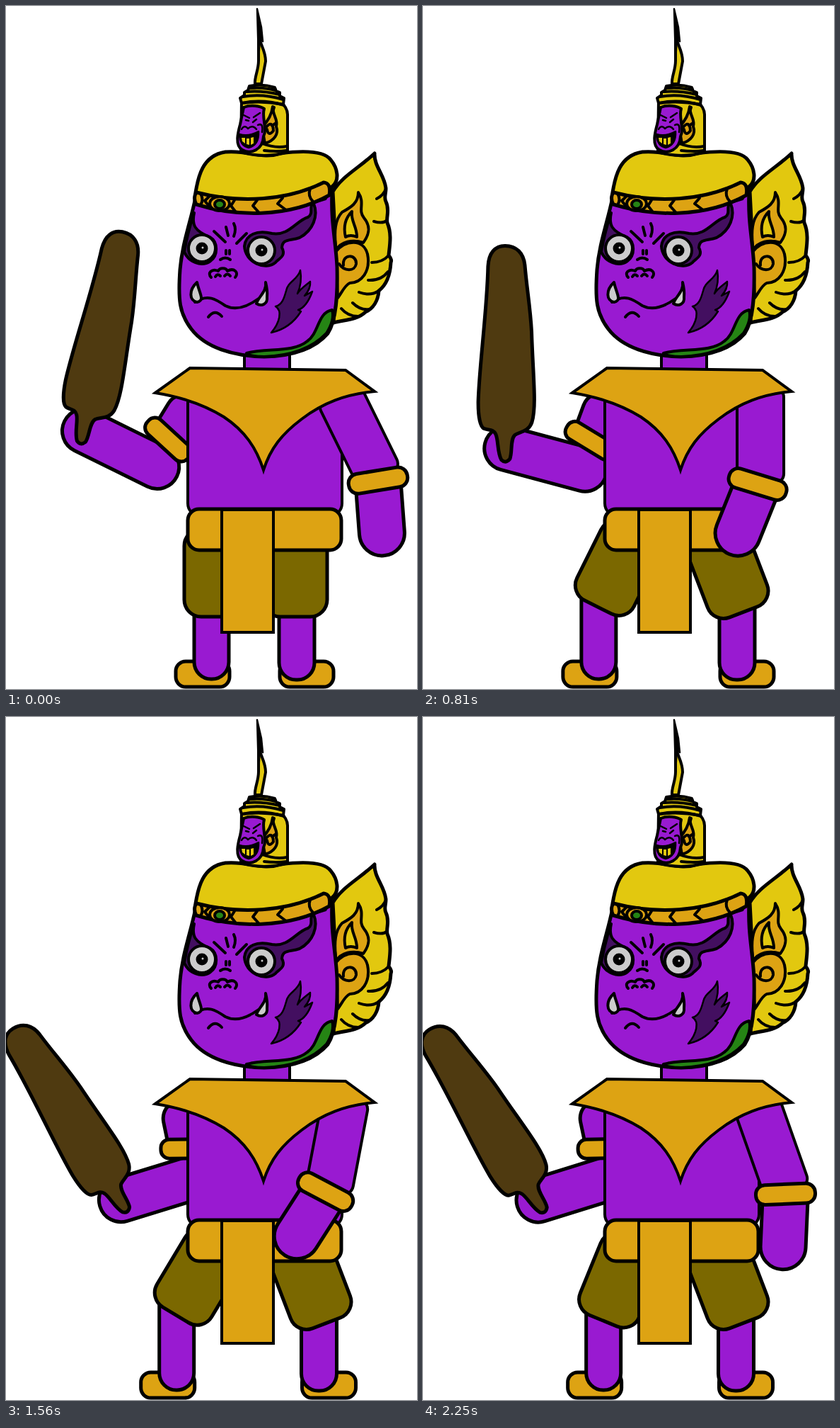
An HTML page that plays this animation: 581x964 px, repeating every 2280 ms.

```html
<!DOCTYPE html>
<html lang="en">
<head>
<meta charset="utf-8">
<title>Marching giant</title>
<style>
html, body { margin: 0; width: 100%; height: 100%; overflow: hidden; background: #fff; }
svg { display: block; width: 581px; height: 964px; }
svg * { stroke-linejoin: round; stroke-linecap: round; }
.body { stroke: #000; stroke-width: 5; }
.p { fill: #991ad1; }
.g { fill: #dda313; }
.y { fill: #e2c80f; }
.o { fill: #7b6800; }
.d { fill: #430f60; }
.n { fill: none; }
.k { fill: #000; }
.thin { stroke-width: 4; }
.fine { stroke-width: 2.5; }
</style>
</head>
<body>
<svg viewBox="0 0 581 964">
<g class="body">
  <g id="armL">
    <rect class="p" x="224" y="546" width="52" height="126" rx="26" transform="rotate(20 250 576)"/>
    <rect class="p" x="87" y="594" width="177" height="62" rx="31" transform="rotate(14.7 118 625)"/>
    <rect class="g" x="198.500" y="600" width="77" height="27" rx="12" transform="rotate(31 237 613)"/>
    <path fill="#4f3a10" d="M115 339C101 339 92 349 91 368C90 430 79 510 78 560C78 580 81 594 86 597C93 600 99 597 103 605C107 614 105 630 111 641Q117 647 123 640C127 630 123 613 130 606C137 601 149 602 154 588C161 565 155 520 153 460C151 425 146 400 143 366C141 349 131 339 115 339Z"/>
  </g>

  <g id="shinL">
    <rect class="g" x="240" y="925" width="76" height="36" rx="14"/>
    <rect class="p" x="266" y="800" width="49" height="150" rx="24"/>
  </g>
  <g id="shinR">
    <rect class="g" x="387" y="925" width="76" height="36" rx="14"/>
    <rect class="p" x="386" y="800" width="50" height="151" rx="24"/>
  </g>
  <rect id="thighL" class="o" x="252" y="738" width="90" height="124" rx="24"/>
  <rect id="thighR" class="o" x="364" y="735" width="90" height="127" rx="24"/>

  <rect class="p thin" x="337" y="480" width="64" height="50"/>
  <rect class="p thin" x="257" y="520" width="218" height="200" rx="18"/>
  <rect class="g" x="257" y="710" width="217" height="58" rx="16"/>
  <rect class="g thin" x="305" y="711" width="73" height="173" style="stroke-linejoin:miter"/>

  <g id="armR">
    <rect class="p thin" x="444" y="538" width="66" height="136" rx="14"/>
    <path class="p" d="M413 672V744A32 32 0 0 0 477 744V672Z" transform="rotate(22 445 744)"/>
    <rect class="g" x="431" y="661" width="84" height="28" rx="13" transform="rotate(17 473 675)"/>
  </g>
  <path class="g thin" style="stroke-linejoin:miter" d="M211 546L260 511L480 514L521 544C480 548 448 560 418 583C390 604 374 624 364 655C354 624 338 600 308 580C279 562 249 552 211 546Z"/>

  <!-- ear -->
  <path class="y" d="M462 262C475 240 500 228 521 208C520 226 536 240 537 258C537 265 534 270 537 276C543 288 537 298 539 306C546 322 542 340 541 352Q546 358 544 362C543 382 536 395 527 402C526 416 519 427 508 432C497 443 478 443 463 447L466 340Z"/>
  <path class="n thin" d="M537 258Q534 267 524 272M539 302Q533 308 520 304M541 352Q532 362 517 362M540 375Q530 388 512 387M527 402Q515 410 499 404M514 428Q501 430 490 419M498 438Q483 438 474 427"/>
  <path class="g thin" d="M466 338C464 318 465 302 475 291C488 284 498 278 498 263C508 278 497 288 506 299C516 311 514 322 505 334C490 329 474 332 466 345Z"/>
  <path class="y thin" d="M480 326C476 309 482 297 489 290C487 304 496 310 496 326Q487 322 480 326Z"/>
  <path class="g thin" d="M466 347C480 330 505 328 511 350C516 375 502 391 486 391C479 394 475 404 469 412Z"/>
  <path class="n thin" d="M477 366C475 349 496 350 495 364C493 375 478 375 471 364"/>

  <!-- face -->
  <path class="p" d="M268 270C261 305 249 335 246 372C243 415 245 434 262 456C282 482 320 494 365 495C405 494 437 483 455 462C467 443 469 408 468 368C466 330 459 305 461 262Z"/>
  <path fill="#258414" class="thin" d="M340 490C370 482 405 490 426 473C443 461 440 433 461 429Q465 443 453 462C432 484 400 494 365 495Q345 495 340 490Z"/>
  <path class="d thin" d="M266 292C262 310 268 318 288 326C300 333 300 352 289 360C276 369 258 361 252 347Q257 318 266 292Z"/>
  <path class="d thin" d="M337 339C339 322 355 316 376 321C400 325 410 303 427 298C436 292 427 282 435 279C442 296 434 317 415 327C401 332 391 328 390 341C397 354 384 357 381 362C367 374 338 362 337 339Z"/>
  <g id="eyes"></g>
  <path class="n thin" d="M294 318L310 333M340 321L326 335M311 312L314 324M322 307Q326 315 322 325M311 345V350M316 345V350M303 358Q310 353 317 358"/>
  <path class="n thin" d="M290 383C284 377 291 370 300 374C302 369 311 369 313 374C322 369 330 376 324 383M296 382Q299 377 303 381M309 381Q313 376 317 381M286 439Q295 427 305 438"/>
  <path class="n thin" d="M267 418C285 406 297 414 310 423C326 431 342 424 357 413"/>
  <path fill="#ccc" class="thin" d="M270 390C258 401 259 416 270 418C282 416 273 405 270 390Z"/>
  <path fill="#ccc" class="thin" d="M367 390C369 403 357 410 354 420C362 425 370 420 369 411Q370 402 367 390Z"/>
  <path class="d fine" d="M416 373C413 386 398 389 396 402C393 413 390 422 381 424C391 430 387 447 375 461C393 457 407 447 417 431L413 429Q425 425 433 403L422 409Q431 399 430 389C424 394 416 399 412 406Q419 390 416 373Z"/>

  <!-- crown -->
  <path class="y" d="M267 270C271 240 278 211 310 206C345 203 360 217 388 208C419 204 449 204 459 217C469 229 472 246 461 255L451 272C400 289 321 288 268 276Z"/>
  <path class="g" d="M269 263C330 279 397 275 449 249Q460 250 457 267C398 300 323 297 269 280Q264 271 269 263Z"/>
  <path class="n thin" d="M275 265Q280 273 275 281M287 269L281 275L289 285M323 274L318 282L325 291M355 274L349 282L358 292M391 271L384 279L396 288M430 258Q426 268 434 276"/>
  <ellipse class="g thin" cx="302" cy="279" rx="14" ry="10"/>
  <ellipse fill="#258414" class="thin" cx="302" cy="280" rx="7" ry="6"/>

  <!-- topknot -->
  <path class="y thin" d="M333 133H386Q398 143 398 153V206Q365 216 332 206Z"/>
  <path class="y thin" d="M333 137L331 130L337 126V122L342 119L344 113Q362 109 380 115L382 120L387 122V127L393 130L392 139Q363 133 333 137Z"/>
  <path class="n thin" d="M344 116Q363 114 381 119M340 121Q362 119 387 125M335 128Q362 123 392 132M334 137Q362 131 393 140M379 143L374 160M362 194Q380 201 397 198M365 204Q382 206 397 204"/>
  <path class="y thin" d="M357 40C359 55 367 62 367 78L361 110H352C351 100 357 91 357 77Z"/>
  <path class="k fine" d="M355 4L361 30L363 50L359 47L357 75Z"/>
  <path class="g thin" d="M362 171Q375 158 377 142C377 155 385 160 382 170C386 181 379 190 366 194Z"/>
  <path class="n thin" d="M367 172Q377 160 378 176Q371 185 369 174M382 165L376 169"/>
  <path class="p thin" d="M336 143C346 139 359 141 365 145C361 157 370 174 364 184C363 203 346 210 334 203C323 197 328 178 331 167Z"/>
  <path class="n fine" d="M336 154L344 158M350 157L359 151M339 161L343 162M349 164L354 160M333 174Q337 167 342 173Q349 167 354 174M356 168Q364 164 362 178"/>
  <path class="k fine" d="M330 181Q343 185 357 177Q358 196 343 200Q331 198 330 181Z"/>
  <path class="y" stroke="none" d="M333 186H338V194L334 191ZM340 187H344V196L340 195ZM346 186L350 185V194L346 196Z"/>
</g>
</svg>
<script>
const LOOP = 2280, STEP = 30;

// [time, value] pairs, joined by straight lines
const tracks = {
  armL: [[0, 11.5], [655, 49], [938, -40], [1265, 50], [1590, -40], [1925, 49], [2220, -40], [2280, -24]],
  armR: [[0, -26.3], [705, 13], [1080, -33.6], [1508, 13], [2010, -8.7], [2280, -20.8]],
  thighL: [[0, 0], [540, 31], [810, 26.5], [1290, 25], [1560, 31], [2010, 24], [2280, 22]],
  thighR: [[0, 0], [540, -21], [2280, -21]],
  shinR: [[0, 0], [540, 36], [810, 33], [1290, 31.5], [2280, 31.5]]
};
const pivots = { armL: '240 575', armR: '488 559', thighL: '301 750', thighR: '413 740' };

const el = id => document.getElementById(id);

function valueAt(track, t) {
  const i = track.findIndex(k => k[0] > t);
  const [t0, a] = track[i - 1], [t1, b] = track[i];
  return a + (b - a) * (t - t0) / (t1 - t0);
}

el('eyes').innerHTML = [[277, 342], [361, 345]].map(([x, y]) =>
  `<circle class="thin" cx="${x}" cy="${y}" r="19" fill="#ccc"/>
   <circle class="k" cx="${x}" cy="${y}" r="8.5" stroke="none"/>
   <circle cx="${x + 1}" cy="${y - 1}" r="1.5" fill="#ccc" stroke="none"/>`).join('');

function draw() {
  const t = Math.floor(performance.now() % LOOP / STEP) * STEP;
  for (const id in pivots)
    el(id).setAttribute('transform', `rotate(${valueAt(tracks[id], t)} ${pivots[id]})`);
  // shins stay upright and follow the knees
  el('shinL').setAttribute('transform', `translate(${-1.59 * valueAt(tracks.thighL, t)} 0)`);
  el('shinR').setAttribute('transform', `translate(${valueAt(tracks.shinR, t)} 0)`);
  requestAnimationFrame(draw);
}
draw();
</script>
</body>
</html>
```
